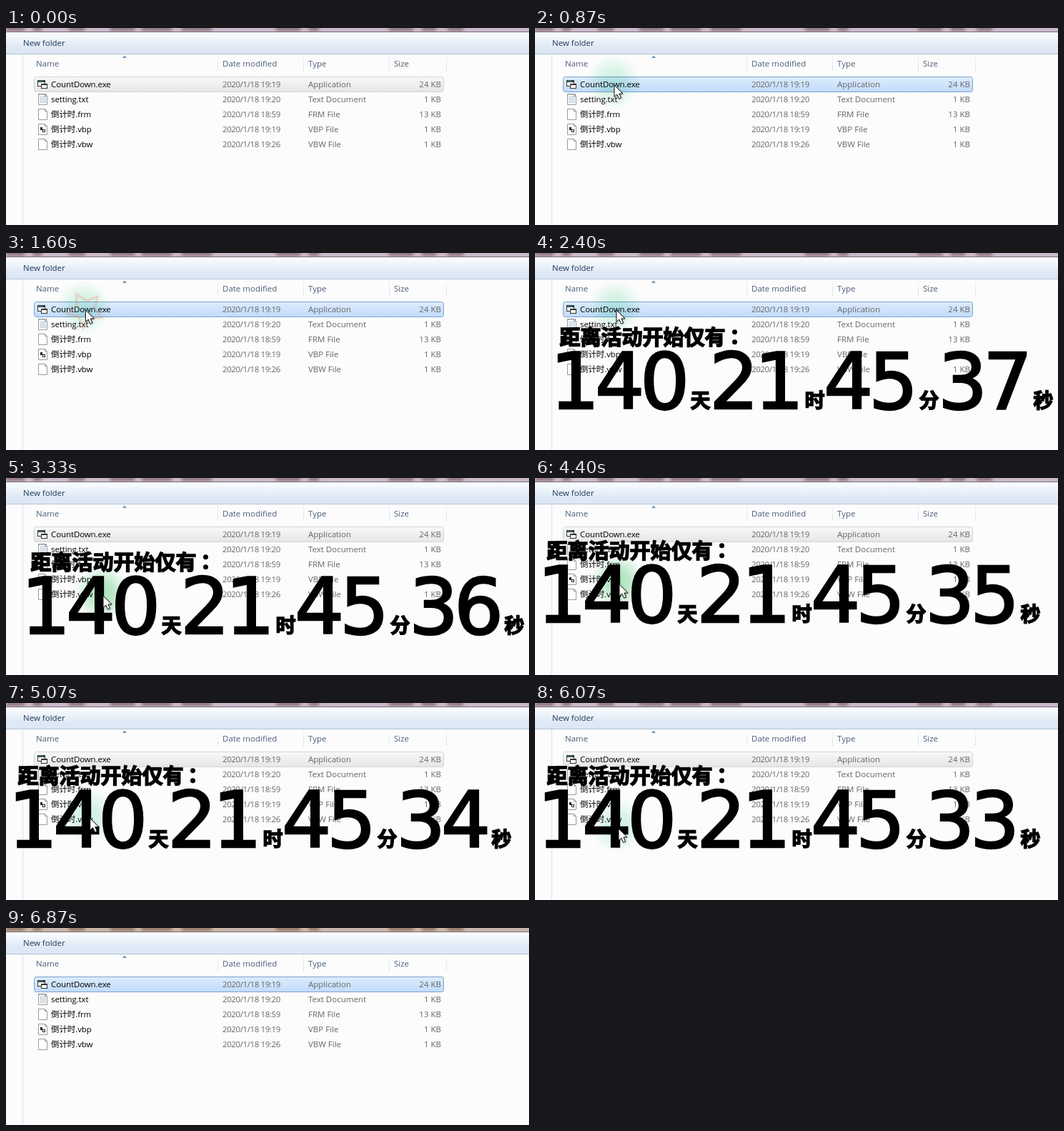
These frames come from a looping animation (732 px wide and 276 px high, 6940 ms). An HTML page with a canvas:

```html
<!DOCTYPE html>
<html lang="en">
<head>
<meta charset="utf-8">
<title>Countdown</title>
<style>
  html, body { margin: 0; width: 100%; height: 100%; overflow: hidden; background: #fcfcfc; }
  canvas { display: block; }
</style>
</head>
<body>
<canvas id="stage" width="732" height="276"></canvas>
<script>
const ctx = document.getElementById('stage').getContext('2d');
const LOOP = 6940, STEP = 1000 / 15;
const UI_FONT = '11.5px "Open Sans", "Noto Sans CJK SC", "Noto Sans CJK", sans-serif';
const CJK_FONT = '"Noto Sans CJK SC", "Noto Sans CJK", sans-serif';
const CENTERED_MARKS_FONT = '"Noto Sans CJK TC", "Noto Sans CJK", sans-serif';

const files = [
  ['CountDown.exe', '19:19', 'Application', '24 KB'],
  ['setting.txt', '19:20', 'Text Document', '1 KB'],
  ['倒计时.frm', '18:59', 'FRM File', '13 KB'],
  ['倒计时.vbp', '19:19', 'VBP File', '1 KB'],
  ['倒计时.vbw', '19:26', 'VBW File', '1 KB'],
];

// Moments of the story, in ms
const FOCUS = 790, OPEN = 2325, BLUR = 3320, CLOSE = 6260;
const clicks = [[930, 111, 80], [3395, 136, 166], [6130, 115.5, 179]];
const LIFE = 735;

// Keys are [time, x, y]
const pointerPath = [
  [130, 115, 186], [330, 115, 180], [800, 112, 98], [865, 111, 80],
  [1500, 111, 80], [2300, 114, 80], [2700, 114, 80], [3330, 136, 165],
  [4600, 136, 165], [4870, 136, 174], [5000, 136, 174], [5330, 135, 192],
];
const dragPath = [
  [3465, 0, 0], [3670, 7, -27], [3866, 15, -54], [4000, 9, -53],
  [4200, -14, -33], [4335, -18, -16],
];

const clamp = v => Math.max(0, Math.min(1, v));

function along(path, t) {
  const next = path.findIndex(key => key[0] > t);
  if (next === 0) return path[0].slice(1);
  if (next < 0) return path[path.length - 1].slice(1);
  const [t0, x0, y0] = path[next - 1], [t1, x1, y1] = path[next];
  const k = (t - t0) / (t1 - t0);
  return [x0 + (x1 - x0) * k, y0 + (y1 - y0) * k];
}

function rect(x, y, w, h, fill) {
  ctx.fillStyle = fill;
  ctx.fillRect(x, y, w, h);
}

function vertical(y0, y1, ...colors) {
  const g = ctx.createLinearGradient(0, y0, 0, y1);
  colors.forEach((c, i) => g.addColorStop(i / (colors.length - 1), c));
  return g;
}

function polygon(points) {
  ctx.beginPath();
  points.forEach(([x, y]) => ctx.lineTo(x, y));
  ctx.closePath();
}

function label(text, x, y, color, spacing = 0, align = 'left') {
  ctx.font = UI_FONT;
  ctx.letterSpacing = spacing + 'px';
  ctx.textAlign = align;
  ctx.fillStyle = color;
  ctx.fillText(text, x, y);
}

function drawGlass(t) {
  const late = t >= CLOSE;
  rect(0, 0, 732, 6, late ? '#c9b6a8' : '#c9b8c8');
  ctx.save();
  ctx.beginPath();
  ctx.rect(0, 0, 732, 5);
  ctx.clip();
  ctx.filter = 'blur(2px)';
  const patches = [[0, 26], [38, 12], [88, 22], [146, 34], [190, 42], [246, 42],
    [378, 34], [424, 14], [536, 34], [582, 20], [618, 22]];
  for (const [x, w] of patches) rect(x, -2, w, 6, late ? '#927566' : '#8d7278');
  ctx.restore();
  rect(0, 5, 732, 1, '#76707f');
}

function drawPage(x, y) {
  polygon([[x, y], [x + 9, y], [x + 12, y + 3], [x + 12, y + 15], [x, y + 15]]);
  ctx.fillStyle = '#fff';
  ctx.fill();
  ctx.strokeStyle = '#9a9a9a';
  ctx.lineWidth = 1;
  ctx.stroke();
  ctx.beginPath();
  ctx.moveTo(x + 9, y);
  ctx.lineTo(x + 9, y + 3);
  ctx.lineTo(x + 12, y + 3);
  ctx.stroke();
}

function drawIcon(row, y) {
  if (row === 0) {
    rect(44, y - 6, 11, 9, '#333');
    rect(45, y - 3, 9, 5, '#fff');
    rect(45, y - 5, 7, 1, '#3f8f98');
    rect(49, y - 1, 9, 7, '#333');
    rect(50, y + 1, 7, 4, '#fff');
    return;
  }
  drawPage(45.5, y - 7.5);
  if (row === 1) {
    for (let i = 0; i < 5; i++) rect(47, y - 4 + i * 2, 9, 1, '#b4c8d4');
    for (let i = 0; i < 5; i++) rect(46 + i * 2.5, y - 8, 1, 2, '#889');
  }
  if (row === 3) {
    rect(48, y - 3, 3, 4, '#222');
    rect(51, y, 4, 4, '#222');
    rect(52, y + 1, 2, 2, '#fff');
  }
}

function drawExplorer(t) {
  rect(0, 0, 732, 276, '#fcfcfc');
  drawGlass(t);
  rect(0, 6, 732, 30, vertical(6, 36, '#fcfdff', '#eef4fb', '#e0e9f5', '#dce7f4'));
  rect(0, 36, 732, 1, '#b4c3d6');
  label('New folder', 24, 25, '#1e395b');
  rect(23, 37, 1, 239, '#d3e3f3');
  for (const x of [296, 416, 536, 616]) rect(x, 38, 1, 22, vertical(38, 60, '#f2f6fb', '#d5dfec'));

  polygon([[163, 42], [166, 38.5], [169, 42]]);
  ctx.fillStyle = '#6c95b5';
  ctx.fill();
  [['Name', 42], ['Date modified', 303], ['Type', 423], ['Size', 543]]
    .forEach(([text, x]) => label(text, x, 54, '#4c607a'));

  const focused = t >= FOCUS && t < BLUR || t >= CLOSE;
  ctx.beginPath();
  ctx.roundRect(39.5, 68.5, 573, 21, 3);
  ctx.fillStyle = focused ? vertical(69, 90, '#dcebfc', '#c1dbfc') : vertical(69, 90, '#f8f8f8', '#e5e5e5');
  ctx.fill();
  ctx.strokeStyle = focused ? '#7da2ce' : '#d4d4d4';
  ctx.lineWidth = 1;
  ctx.stroke();

  files.forEach(([name, time, type, size], row) => {
    const y = 79 + row * 21;
    drawIcon(row, y);
    label(name, 63, y + 4, '#000', -0.1);
    label('2020/1/18 ' + time, 303, y + 4, '#666', -0.4);
    label(type, 423, y + 4, '#666');
    label(size, 609, y + 4, '#666', 0, 'right');
  });
}

function heavyText(text, x, y, font, weight, spacing = 0) {
  ctx.font = font;
  ctx.letterSpacing = spacing + 'px';
  ctx.textAlign = 'left';
  ctx.fillStyle = ctx.strokeStyle = '#000';
  ctx.lineWidth = weight;
  ctx.lineJoin = 'miter';
  ctx.miterLimit = 3;
  ctx.fillText(text, x, y);
  ctx.strokeText(text, x, y);
}

function drawCountdown(t, [dx, dy]) {
  const seconds = 37 - Math.max(0, Math.floor((t - 2060) / 1000));
  const pitch = 63, spacing = -6.3;
  ctx.save();
  ctx.translate(dx, dy);
  heavyText('距离活动开始仅有', 34.5, 128.5, 'bold 29px ' + CJK_FONT, 1.5);
  heavyText('：', 265, 128.5, 'bold 29px ' + CENTERED_MARKS_FONT, 1.5);
  [['140', '天'], ['21', '时'], ['45', '分'], [String(seconds), '秒']].forEach(([digits, unit], i) => {
    const x = 217.5 + i * 160;
    heavyText(digits, x - digits.length * pitch - 7.5, 217.5, '109px "DejaVu Sans", sans-serif', 2.5, spacing);
    heavyText(unit, x, 216.5, 'bold 28px ' + CJK_FONT, 1.5);
  });
  ctx.restore();
}

function drawStar(progress, x, y) {
  const radius = 28 * progress;
  const points = Array.from({ length: 10 }, (_, i) => {
    const a = -Math.PI / 2 + progress * 0.82 + i * Math.PI / 5;
    const r = i % 2 ? radius * 0.52 : radius;
    return [x + r * Math.cos(a), y + r * Math.sin(a)];
  });
  polygon(points);
  ctx.save();
  ctx.globalAlpha = clamp((1 - progress) * 2.2);
  ctx.lineJoin = 'miter';
  ctx.strokeStyle = '#f0705f';
  ctx.lineWidth = 3.5;
  ctx.stroke();
  ctx.strokeStyle = '#f9b3a8';
  ctx.lineWidth = 1;
  ctx.stroke();
  ctx.restore();
}

function drawHalo(x, y, pressed) {
  const g = ctx.createRadialGradient(x, y, 0, x, y, 38);
  const color = pressed ? '140,220,165' : '190,240,215';
  [[0, 0.75], [0.45, 0.55], [0.8, 0.2], [1, 0]].forEach(([p, a]) => g.addColorStop(p, `rgba(${color},${a})`));
  ctx.globalCompositeOperation = 'multiply';
  rect(x - 38, y - 38, 76, 76, g);
  ctx.globalCompositeOperation = 'source-over';
}

function drawArrow(x, y) {
  ctx.save();
  ctx.translate(x, y);
  polygon([[0, 0], [0, 16.5], [3.8, 13], [6.6, 19.3], [9.6, 18], [6.9, 12], [12, 12]]);
  ctx.shadowColor = 'rgba(0,0,0,.35)';
  ctx.shadowBlur = 3;
  ctx.shadowOffsetX = ctx.shadowOffsetY = 1;
  ctx.fillStyle = '#fff';
  ctx.fill();
  ctx.shadowColor = 'transparent';
  ctx.strokeStyle = '#111';
  ctx.lineWidth = 1;
  ctx.lineJoin = 'miter';
  ctx.stroke();
  ctx.restore();
}

function draw(now) {
  const t = Math.floor((now % LOOP + 5) / STEP) * STEP;
  const drag = along(dragPath, t);
  const [px, py] = along(pointerPath, t);
  const x = px + drag[0], y = py + drag[1];
  const pointerAlpha = clamp((t - 65) / 200) * clamp((6860 - t) / 200);

  drawExplorer(t);
  if (t >= OPEN && t < CLOSE) drawCountdown(t, drag);

  ctx.globalAlpha = pointerAlpha;
  drawHalo(x - 2, y - 4, t >= BLUR && t < 4500);
  ctx.globalAlpha = 1;
  for (const [start, cx, cy] of clicks) {
    const progress = (t - start) / LIFE;
    if (progress > 0 && progress < 1) drawStar(progress, cx, cy);
  }
  ctx.globalAlpha = pointerAlpha;
  drawArrow(x, y);
  ctx.globalAlpha = 1;
  requestAnimationFrame(() => draw(performance.now()));
}
draw(performance.now());
</script>
</body>
</html>
```
